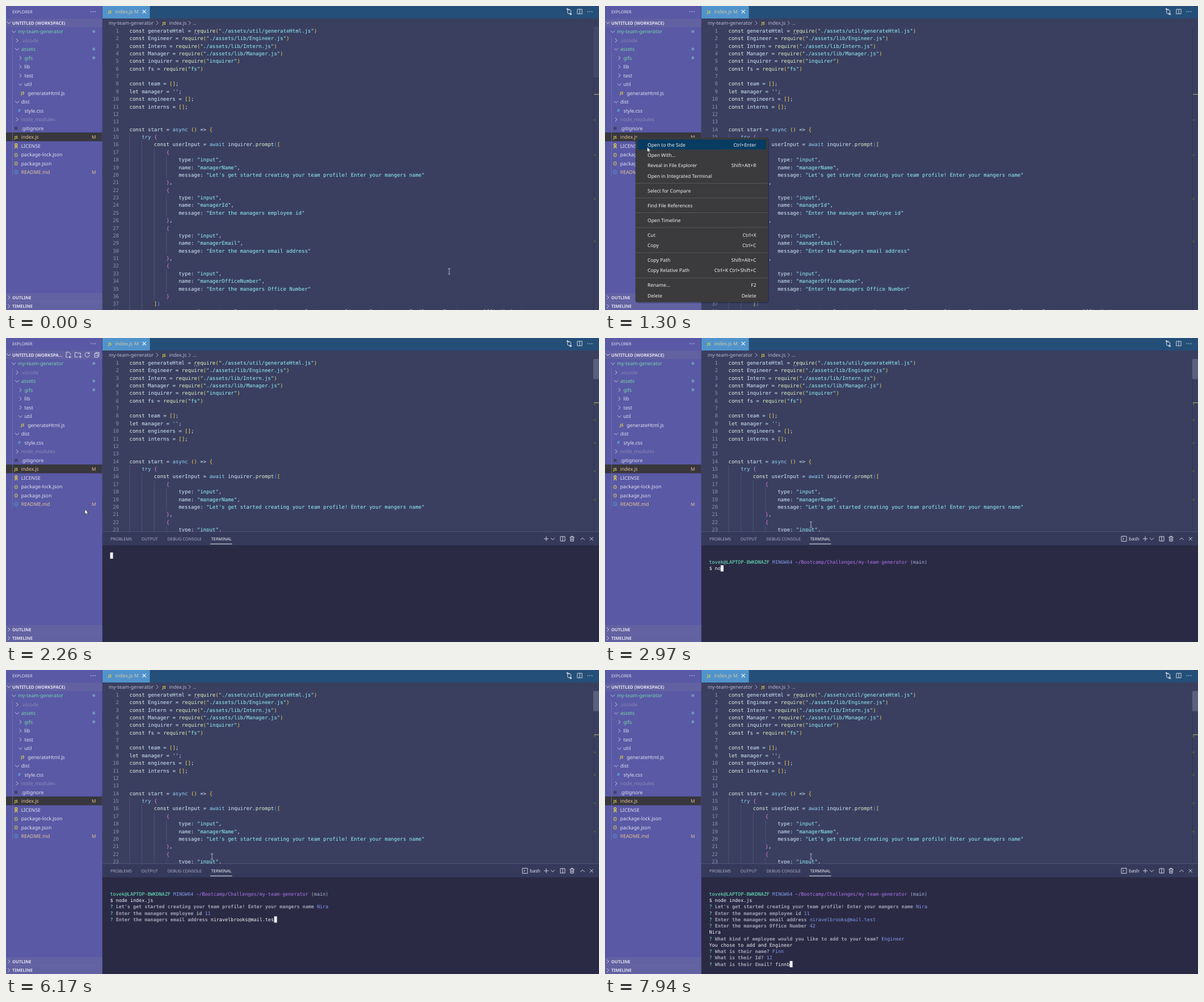
Write an HTML page that moves like this. It is 1045x536 px and loops after 8000 ms.

```html
<!DOCTYPE html>
<html lang="en">
<head>
<meta charset="utf-8">
<title>Team generator session</title>
<style>
  html, body { margin: 0; width: 100%; height: 100%; overflow: hidden; background: #3a3f60; }
  svg { display: block; position: absolute; left: 0; top: 0; }
  text { font-family: "Noto Sans", "Open Sans", sans-serif; white-space: pre; text-rendering: geometricPrecision; }
  .mono { font-family: "DejaVu Sans Mono", "Noto Sans Mono", monospace; }
</style>
</head>
<body>
<svg id="stage" width="1045" height="536" viewBox="0 0 1045 536"></svg>
<script>
const LOOP = 8000;
const stage = document.getElementById('stage');

// ---- drawing helpers ----
function el(tag, attrs, parent = stage) {
  const node = document.createElementNS('http://www.w3.org/2000/svg', tag);
  for (const key in attrs) node.setAttribute(key, attrs[key]);
  parent.appendChild(node);
  return node;
}
const group = (parent = stage) => el('g', {}, parent);
const rect = (x, y, width, height, fill, parent, extra) =>
  el('rect', { x, y, width, height, fill, ...extra }, parent);
const stroke = (d, color, parent, width = 0.9) =>
  el('path', { d, fill: 'none', stroke: color, 'stroke-width': width }, parent);
function label(x, y, str, size, fill, parent, extra) {
  const node = el('text', { x, y, 'font-size': size, fill, ...extra }, parent);
  node.textContent = str;
  return node;
}
function spans(x, y, parts, size, parent) {
  const node = el('text', { x, y, 'font-size': size, class: 'mono' }, parent);
  for (const [str, fill, bold] of parts) {
    const span = el('tspan', { fill, 'font-weight': bold ? 700 : 400 }, node);
    span.textContent = str;
  }
}
const chevron = (x, y, open, color, parent) => stroke(open
  ? `M${x - 3.4} ${y - 1.7}l3.4 3.4 3.4-3.4`
  : `M${x - 1.7} ${y - 3.4}l3.4 3.4-3.4 3.4`, color, parent);
const show = (node, on) => node.setAttribute('visibility', on ? 'visible' : 'hidden');
function dots(x, y, parent) {
  for (const dx of [-3.6, 0, 3.6]) el('circle', { cx: x + dx, cy: y, r: 0.8, fill: '#e6e6f2' }, parent);
}

const INK = '#e2e2f0', YELLOW = '#e0cf4a', MODIFIED = '#e6c592', GREEN = '#78d6a6', IGNORED = '#8f89b4';

// ---- editor ----
const CODE_X = 217.5, CODE_W = 5.418, CODE_H = 13.375;
const BRACKETS = ['#f2d44a', '#d678d8', '#4a9df0'];
const fields = [
  ['managerName', "Let's get started creating your team profile! Enter your mangers name"],
  ['managerId', 'Enter the managers employee id'],
  ['managerEmail', 'Enter the managers email address'],
  ['managerOfficeNumber', 'Enter the managers Office Number'],
];
const pad = n => ' '.repeat(n);
const code = [
  'const generateHtml = require("./assets/util/generateHtml.js")',
  ...['Engineer', 'Intern', 'Manager'].map(n => `const ${n} = require("./assets/lib/${n}.js")`),
  'const inquirer = require("inquirer")',
  'const fs = require("fs")',
  '',
  'const team = [];',
  "let manager = '';",
  'const engineers = [];',
  'const interns = [];',
  '', '',
  'const start = async () => {',
  pad(4) + 'try {',
  pad(8) + 'const userInput = await inquirer.prompt([',
  ...fields.flatMap(([name, message], i) => [
    pad(12) + '{',
    pad(16) + 'type: "input",',
    pad(16) + `name: "${name}",`,
    pad(16) + `message: "${message}"`,
    pad(12) + (i < 3 ? '},' : '}'),
  ]),
  pad(8) + '])',
  pad(8) + `manager = new Manager(${fields.map(f => 'userInput.' + f[0]).join(', ')});`,
];

let depth = 0;
function highlight(line) {
  const token = /("[^"]*"|'')|\b(const|let)\b|\b(async|await|try|new)\b|(\w+)(?=\()|([([{])|([)\]}])|\w+|\s+|./g;
  return [...line.matchAll(token)].map(m => {
    let color = '#d3e9f8';
    if (m[1]) color = '#93f3f6';
    else if (m[2]) color = '#e4efe6';
    else if (m[3]) color = '#8fd0f5';
    else if (m[4]) color = '#d9f0c4';
    else if (m[5]) color = BRACKETS[depth++ % 3];
    else if (m[6]) color = BRACKETS[--depth % 3];
    return [m[0], color];
  });
}

rect(170, 0, 875, 536, '#3a3f60');
const guide = (col, from, to) => stroke(
  `M${CODE_X + 0.3 + col * CODE_W} ${37 + (from - 1) * CODE_H}V${37 + to * CODE_H}`, '#555a7c', stage, 0.8);
guide(0, 15, 38);
guide(4, 16, 38);
guide(8, 17, 36);
fields.forEach((_, i) => guide(12, 18 + 5 * i, 20 + 5 * i));
code.forEach((line, i) => {
  const y = 46.8 + i * CODE_H;
  label(199, y, i + 1, 9, '#8a90ae', stage, { class: 'mono', 'text-anchor': 'end' });
  spans(CODE_X, y, highlight(line), 9);
});
for (const x of [332, 335.3, 338.6]) rect(x, 48.2, 1.2, 1.2, '#c9cfdf');

function ruler(parent, line, marks) {
  rect(1036, line, 9, 1.4, '#9a9a62', parent);
  for (const y of marks) rect(1036, y - 1.5, 2.4, 3, '#4c6b3c', parent);
}
stroke('M1035.5 37V536', '#2f3350', stage, 0.8);
const tallRuler = group();
ruler(tallRuler, 155, [201, 263, 340, 415]);
const tallSlider = rect(1035, 37, 10, 89, '#5b607e');

// ---- tab bar and breadcrumbs ----
rect(170, 0, 875, 22, '#244f78');
rect(170, 0, 83.5, 22, '#5093cb');
label(180, 12.6, 'JS', 7, YELLOW, stage, { 'font-weight': 700 });
label(192.5, 13, 'index.js', 8.7, '#d9c7a2');
label(226, 13, 'M', 8.4, '#d9c7a2');
stroke('M240.6 6.8l6 6m0-6l-6 6', '#fff', stage, 1.1);
stroke('M989.5 6v5q0 2.5 2.5 2.5h2.5m-1.6-1.8l1.8 1.8-1.8 1.8M995.5 14V9q0-2.5-2.5-2.5h-2m1.6-1.8l-1.8 1.8 1.8 1.8', INK);
el('circle', { cx: 989.3, cy: 5.4, r: 1.3, fill: INK });
el('circle', { cx: 995.6, cy: 14.4, r: 1.3, fill: INK });
stroke('M1006.8 5.8h8.4v8h-8.4zM1011 5.8v8', INK);
dots(1029, 10);
label(181, 33, 'my-team-generator', 8.6, '#b9bdd0');
chevron(266.5, 30, false, '#b9bdd0');
label(275.5, 32.6, 'JS', 7, YELLOW, stage, { 'font-weight': 700 });
label(287.5, 33, 'index.js', 8.6, '#b9bdd0');
chevron(323.5, 30, false, '#b9bdd0');
label(329, 33, '...', 8.6, '#b9bdd0');

// ---- sidebar ----
rect(0, 0, 169.5, 536, '#5959a6');
rect(0, 22.5, 169.5, 15, '#6261a1');
rect(0, 506, 169.5, 30, '#6261a1');
stroke('M0 521.2H169.5', '#6f6eac', stage, 0.6);
label(11, 12.6, 'EXPLORER', 7.4, INK);
dots(153.5, 10);
chevron(5, 29.5, true, INK);
const title = label(11, 32.6, '', 7.8, INK, stage, { 'font-weight': 700 });
[['OUTLINE', 514], ['TIMELINE', 529.3]].forEach(([name, y]) => {
  chevron(5, y, false, INK);
  label(11, y + 2.8, name, 7.5, INK, stage, { 'font-weight': 700 });
});
const actions = group();
stroke('M111 25h-5v9h3M111 25l2.5 2.5v2M110 33.5h5M112.5 31v5', INK, actions);
stroke('M127 33.5h-5.5v-8h3.5l1 1.2h5.5v3M128.5 33h5M131 30.5v5', INK, actions);
stroke('M146.4 27.2a4 4 0 1 0 .8 2.6M146.8 24.6v2.8h-2.8', INK, actions);
stroke('M156 27.5h6v6.5h-6zM158 27.5v-2h6v6.5h-2M157.5 30.8h3', INK, actions);

// name, level, kind, colour, badge
const tree = [
  ['my-team-generator', 0, 'open', GREEN, 'dot'],
  ['.vscode', 1, 'shut', IGNORED],
  ['assets', 1, 'open', GREEN, 'dot'],
  ['gifs', 2, 'shut', GREEN, 'dot'],
  ['lib', 2, 'shut', INK],
  ['test', 2, 'shut', INK],
  ['util', 2, 'open', INK],
  ['generateHtml.js', 3, 'JS', INK],
  ['dist', 1, 'open', INK],
  ['style.css', 2, '#', INK],
  ['node_modules', 1, 'shut', IGNORED],
  ['.gitignore', 1, 'square', INK],
  ['index.js', 1, 'JS', MODIFIED, 'M'],
  ['LICENSE', 1, 'key', INK],
  ['package-lock.json', 1, '{}', INK],
  ['package.json', 1, '{}', INK],
  ['README.md', 1, 'info', MODIFIED, 'M'],
];
rect(0, 223, 169.5, 15.5, '#38373d');
stroke('M11.5 53V301', '#7675b6', stage, 0.7);
tree.forEach(([name, level, kind, color, badge], i) => {
  const y = 45.2 + 15.5 * i, x = 21 + 5.75 * level, ix = x - 9;
  label(x, y + 3.1, name, 8.7, color);
  if (kind === 'open' || kind === 'shut') chevron(x - 7.2, y, kind === 'open', '#d4d4e6');
  else if (kind === 'square') rect(ix - 2.5, y - 2.5, 5, 5, '#41415f');
  else if (kind === 'key') {
    el('circle', { cx: ix, cy: y - 2, r: 1.9, fill: 'none', stroke: YELLOW, 'stroke-width': 1.4 });
    stroke(`M${ix - 0.8} ${y}l-1.2 4.4M${ix + 0.8} ${y}l1.4 4.4`, YELLOW, stage, 1.5);
  } else if (kind === 'info') {
    el('circle', { cx: ix, cy: y - 0.4, r: 3.4, fill: 'none', stroke: '#57a5d8', 'stroke-width': 0.8 });
    stroke(`M${ix} ${y - 2.4}v1M${ix} ${y - 0.8}v2.6`, '#57a5d8');
  } else {
    label(ix, y + 2.6, kind, kind === 'JS' ? 7 : 8, kind === '#' ? '#57a5d8' : YELLOW, stage,
      { 'text-anchor': 'middle', 'font-weight': 700 });
  }
  if (badge === 'dot') el('circle', { cx: 154.8, cy: y - 0.4, r: 2.6, fill: '#6f93b4' });
  if (badge === 'M') label(151, y + 3, 'M', 8.2, MODIFIED);
});

// ---- terminal panel ----
const panel = group();
rect(1034, 37, 11, 305, '#3a3f60', panel);
stroke('M1035.5 37V342', '#2f3350', panel, 0.8);
rect(1035, 37, 10, 35.5, '#5b607e', panel);
ruler(panel, 113.5, [117, 145, 185, 235, 285]);
rect(170, 341.5, 875, 194.5, '#2b2a45', panel);
rect(170, 341.5, 875, 24, '#363a5a', panel);
stroke('M170 341.5H1045', '#55597a', panel, 0.8);
[['PROBLEMS', 184], ['OUTPUT', 238.5], ['DEBUG CONSOLE', 284.5], ['TERMINAL', 361.5]].forEach(([name, x], i) =>
  label(x, 357, name, 7.35, i === 3 ? '#f0f0f6' : '#a9adc2', panel));
rect(360, 362.6, 38.5, 1, '#e6e6f0', panel);
stroke('M948 354h8M952 350v8M977 350h8v8h-8zM981 350v8', INK, panel);
chevron(963.5, 354.2, true, INK, panel);
stroke('M993.5 351.2h8M996 351v-1.4h3V351M994.5 351.2l.4 7h5.2l.4-7M996.6 353v3.6M998.5 353v3.6', INK, panel);
stroke('M1012.5 356l3.6-3.6 3.6 3.6M1028.8 351l6 6m0-6l-6 6', INK, panel);
const shell = group(panel);
stroke('M910 349.5h9v9h-9zM912.3 351.8l2.2 2.2-2.2 2.2', INK, shell);
label(923, 357, 'bash', 8.2, INK, shell);
const screen = group(panel);

const TERM_X = 183.5, TERM_W = 5.07, TERM_H = 11.245, KEY = 68;
const WHITE = '#f2f2f8', MINT = '#6cf0c6', BLUE = '#7f9cea', GREY = '#a2a2b4';
const choices = ['Engineer', 'Intern', 'None'];
const command = { text: 'node index.js', type: 2900, done: 3790 };
const prompts = [
  { row: 2, q: fields[0][1], a: 'Nira', ask: 3860, type: 4060, done: 4350 },
  { row: 3, q: fields[1][1], a: '11', ask: 4350, type: 4420, done: 4570 },
  { row: 4, q: fields[2][1], a: 'niravelbrooks@mail.test', ask: 4570, type: 4720, done: 6310 },
  { row: 5, q: fields[3][1], a: '42', ask: 6310, type: 6380, done: 6510, echo: 'Nira' },
  { row: 7, q: 'What kind of employee would you like to add to your team?', a: 'Engineer',
    ask: 6510, done: 6740, list: true, echo: 'You chose to add and Engineer' },
  { row: 9, q: 'What is their name?', a: 'Finn', ask: 6740, type: 6950, done: 7240 },
  { row: 10, q: 'What is their Id?', a: '12', ask: 7240, type: 7440, done: 7580 },
  { row: 11, q: 'What is their Email?', a: 'finnb', ask: 7580, type: 7645, done: LOOP },
];
const typed = (text, from, t) => text.slice(0, Math.max(0, Math.floor((t - from) / KEY) + 1));

function terminalAt(t) {
  const rows = [];
  if (t < 2540) return { rows, cursor: [-1, 0] };
  rows[0] = [['tovek@LAPTOP-8WKDNAZF', MINT], [' MINGW64', BLUE],
    [' ~/Bootcamp/Challenges/my-team-generator', '#b077ee'], [' (main)', '#a9b4d4']];
  const cmd = typed(command.text, command.type, t);
  rows[1] = [['$ ' + cmd, WHITE]];
  let cursor = t < command.done ? [1, 2 + cmd.length] : [2, 0];
  for (const p of prompts) {
    if (t < p.ask) break;
    const head = [['? ', MINT], [p.q + ' ', GREY, true]];
    if (t >= p.done) {
      rows[p.row] = [...head, [p.a, BLUE]];
      if (p.echo) rows[p.row + 1] = [[p.echo, WHITE]];
    } else if (p.list) {
      rows[p.row] = [...head, ['(Use arrow keys)', GREY]];
      choices.forEach((c, i) => rows[p.row + 1 + i] = [[(i ? '  ' : '> ') + c, i ? WHITE : MINT]]);
      cursor = null;
    } else {
      const input = typed(p.a, p.type, t);
      rows[p.row] = [...head, [input, WHITE]];
      cursor = [p.row, 3 + p.q.length + input.length];
    }
  }
  return { rows, cursor };
}

let drawn = '';
function drawTerminal(t) {
  const state = terminalAt(t), key = JSON.stringify(state);
  if (key === drawn) return;
  drawn = key;
  screen.replaceChildren();
  state.rows.forEach((parts, r) => spans(TERM_X, 398 + r * TERM_H, parts, 8.42, screen));
  if (state.cursor) {
    const [r, c] = state.cursor;
    rect(TERM_X + c * TERM_W, 389.4 + r * TERM_H, TERM_W, 11, WHITE, screen);
  }
}

// ---- context menu ----
const items = [
  ['Open to the Side', 244.5, 'Ctrl+Enter'], ['Open With...', 263, ''],
  ['Reveal in File Explorer', 281, 'Shift+Alt+R'], ['Open in Integrated Terminal', 299.5, ''],
  ['Select for Compare', 325.5, ''], ['Find File References', 351.5, ''], ['Open Timeline', 378, ''],
  ['Cut', 404, 'Ctrl+X'], ['Copy', 422, 'Ctrl+C'],
  ['Copy Path', 448, 'Shift+Alt+C'], ['Copy Relative Path', 466.3, 'Ctrl+K Ctrl+Shift+C'],
  ['Rename...', 492.3, 'F2'], ['Delete', 510.8, 'Delete'],
];
const menu = group();
rect(53, 232, 236, 292, '#000', menu, { rx: 5, opacity: 0.22 });
rect(54, 232, 233, 290, '#3b3b3d', menu, { rx: 3 });
const hover = rect(57, 0, 227, 17.6, '#063b62', menu, { rx: 2.5 });
for (const y of [312.5, 338.5, 364.5, 390.8, 435, 479.5]) stroke(`M54 ${y}H287`, '#5e5e60', menu, 0.8);
for (const [name, y, keys] of items) {
  label(75, y + 3, name, 8.5, '#f2f2f2', menu);
  label(266.5, y + 3, keys, 8.5, '#f2f2f2', menu, { 'text-anchor': 'end' });
}

// ---- mouse ----
const mouse = group();
const click = el('circle', { r: 8.5 }, mouse);
const pointers = {
  hand: el('path', { fill: '#fff', stroke: '#222', 'stroke-width': 0.6,
    d: 'M-1 .8q1-1.4 2 0v3.4l3.6.8q1 .3.9 1.4l-.6 4H.2l-3-3.8q0-1.2 1.4-.6l.4.4z' }, mouse),
  arrow: el('path', { fill: '#fff', stroke: '#222', 'stroke-width': 0.6,
    d: 'M0 0v8.6l2-1.8 1.3 3 1.5-.7-1.3-2.9h2.6z' }, mouse),
  beam: stroke('M-2.2-5h1.6l.6.6.6-.6h1.6M-2.2 5h1.6l.6-.6.6.6h1.6M0-4.4v8.8', '#d5d8e4', mouse, 0.8),
};
const path = [
  [70, 781, 468], [630, 54, 232], [980, 54, 232], [1990, 139, 302], [2470, 139, 302], [2750, 363, 329],
];
function mouseAt(t) {
  const i = path.findIndex(p => p[0] > t);
  if (i < 1) return (i ? path[path.length - 1] : path[0]).slice(1);
  const [t0, x0, y0] = path[i - 1], [t1, x1, y1] = path[i];
  const u = (t - t0) / (t1 - t0), e = u * u * (3 - 2 * u);
  return [x0 + (x1 - x0) * e, y0 + (y1 - y0) * e];
}

const MENU_OPEN = 910, MENU_SHUT = 2190, PANEL_OPEN = 2260;
function render(t) {
  const [x, y] = mouseAt(t);
  const menuOn = t >= MENU_OPEN && t < MENU_SHUT, panelOn = t >= PANEL_OPEN;
  const inSidebar = x < 170;

  show(menu, menuOn);
  const item = menuOn && items.find(it => Math.abs(y - it[1]) < 9.2);
  show(hover, Boolean(item));
  if (item) hover.setAttribute('y', item[1] - 9);

  show(panel, panelOn);
  show(shell, panelOn && t >= 2470);
  show(tallRuler, !panelOn);
  tallSlider.setAttribute('opacity', panelOn ? 0 : 0.3 * Math.min(1, Math.max(0, (630 - t) / 230)));
  if (panelOn) drawTerminal(t);

  const tools = inSidebar && !menuOn;
  show(actions, tools);
  title.textContent = tools ? 'UNTITLED (WORKSPA...' : 'UNTITLED (WORKSPACE)';

  const kind = !inSidebar ? 'beam' : menuOn || y > 300 ? 'arrow' : 'hand';
  for (const name in pointers) show(pointers[name], name === kind);
  mouse.setAttribute('transform', `translate(${x} ${y})`);
  const right = t >= 840 && t < 980, left = t >= 2050 && t < 2190;
  show(click, right || left);
  click.setAttribute('fill', right ? '#c8202c' : '#a9b022');
  click.setAttribute('opacity', right ? 0.9 : 0.85);
}

const began = performance.now();
function tick() {
  render((performance.now() - began) % LOOP);
  requestAnimationFrame(tick);
}
tick();
</script>
</body>
</html>
```
